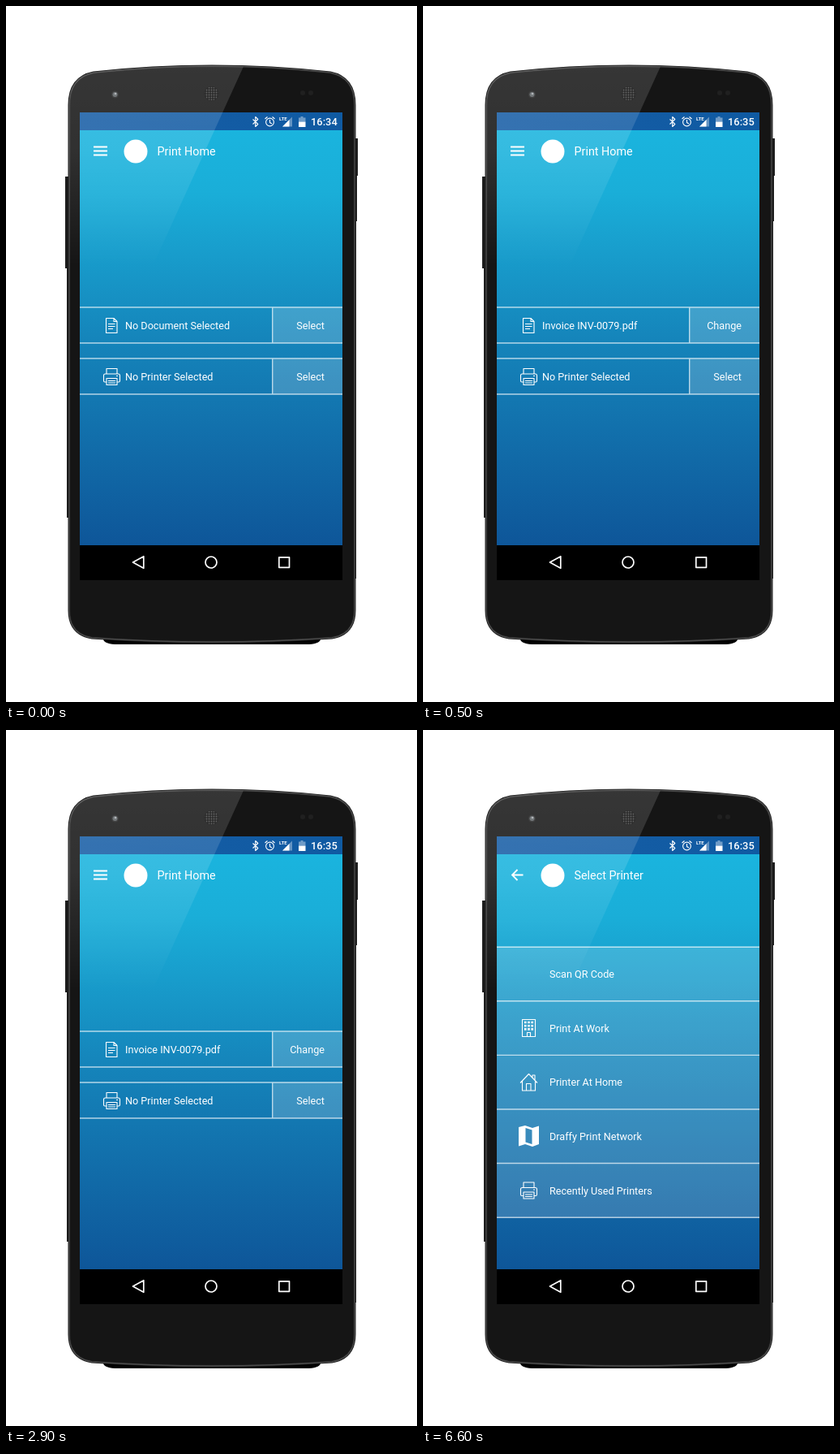
Animation, 507 px wide and 857 px high, one loop 8000 ms. Source, as an HTML page:

```html
<!DOCTYPE html>
<html lang="en">
<head>
<meta charset="utf-8">
<title>Print app</title>
<style>
  html, body { margin: 0; width: 100%; height: 100%; overflow: hidden; background: #fff; }
  svg { display: block; width: 507px; height: 857px; }
  text { font: 12.65px Roboto, sans-serif; fill: #fff; }
  .title { font-size: 14.35px; }
  .clock { font-size: 12.9px; font-weight: 500; }
  .end { text-anchor: end; }
  .icon { fill: none; stroke: #fff; stroke-width: 1.1; stroke-linejoin: round; }
  .rule { fill: none; stroke: #fff; stroke-opacity: .68; stroke-width: 1.4; }

  /* Screens cut hard at 500 ms and 4500 ms of an 8 s loop. */
  .first, .later, .home, .list { animation: 8s step-end infinite; }
  .first { animation-name: first; }
  .later { animation-name: later; }
  .home { animation-name: home; }
  .list { animation-name: list; }
  @keyframes first { 0% { opacity: 1 } 6.25%, 100% { opacity: 0 } }
  @keyframes later { 0% { opacity: 0 } 6.25%, 100% { opacity: 1 } }
  @keyframes home { 0% { opacity: 1 } 56.25%, 100% { opacity: 0 } }
  @keyframes list { 0% { opacity: 0 } 56.25%, 100% { opacity: 1 } }
</style>
</head>
<body>
<svg viewBox="0 0 507 857" xmlns="http://www.w3.org/2000/svg">
  <defs>
    <linearGradient id="sky" x1="0" y1="0" x2="0" y2="1">
      <stop offset="0" stop-color="#1ab4de"/>
      <stop offset=".15" stop-color="#1aaed8"/>
      <stop offset=".5" stop-color="#1585bb"/>
      <stop offset="1" stop-color="#0e5699"/>
    </linearGradient>
    <linearGradient id="bar">
      <stop offset="0" stop-color="#185ea6"/>
      <stop offset="1" stop-color="#0f5aa2"/>
    </linearGradient>
    <linearGradient id="gloss" gradientUnits="userSpaceOnUse" x1="0" y1="77" x2="0" y2="320">
      <stop offset="0" stop-color="#fff" stop-opacity=".14"/>
      <stop offset=".4" stop-color="#fff" stop-opacity=".12"/>
      <stop offset="1" stop-color="#fff" stop-opacity="0"/>
    </linearGradient>
    <pattern id="mesh" width="3" height="3" patternUnits="userSpaceOnUse">
      <circle cx="1.5" cy="1.5" r=".9" fill="#4c4c4c"/>
    </pattern>
    <path id="shell" d="M78 122C78 99 88 86 108 82Q180 74 254 74T400 82C420 86 430 99 430 122V744C430 765 420 775 402 778Q330 783 254 783T106 778C88 775 78 765 78 744Z"/>
    <clipPath id="body"><use href="#shell"/></clipPath>
    <g id="printer" class="icon">
      <path d="M124 453V446.5H137V453M124 463H122Q120.500 463 120.500 461.500V455Q120.500 453 122.500 453H138.500Q140.500 453 140.500 455V461.500Q140.500 463 139 463H137M124 458.500H137V466.500H124ZM126 461.500H135M126 464H135M136 455.500H138"/>
    </g>
  </defs>

  <!-- phone -->
  <path d="M120 774H388V780Q386 786 370 786H138Q122 786 120 780Z"/>
  <path d="M73 210H79V323H73ZM429 163H434V209H429ZM75 323H79V630H75ZM429 209H433V265H429ZM429 265H432V705H429Z" fill="#1c1c1c"/>
  <use href="#shell" fill="#151515" stroke="#1b1b1b" stroke-width="3"/>
  <use href="#shell" fill="none" stroke="#4b4b4b" stroke-width="1.3"/>
  <circle cx="134.500" cy="109" r="4.500" fill="#242424"/>
  <circle cx="134.500" cy="109" r="3" fill="#5d6265"/>
  <circle cx="135" cy="108" r="1.300" fill="#a5aaad"/>
  <circle cx="253.500" cy="108" r="9" fill="#0b0b0b"/>
  <circle cx="253.500" cy="108" r="8.500" fill="url(#mesh)"/>
  <g fill="#202020"><circle cx="366" cy="107" r="3"/><circle cx="376" cy="107" r="3"/></g>

  <!-- screen -->
  <rect x="91" y="131" width="324" height="576"/>
  <rect x="91" y="153" width="324" height="511" fill="url(#sky)"/>
  <rect x="91" y="131" width="324" height="22" fill="url(#bar)"/>
  <path d="M78 70H295L181 320H78Z" fill="url(#gloss)" clip-path="url(#body)"/>

  <!-- status bar -->
  <path class="icon" d="M304.500 139.500L310.800 145.500L307.700 148.500V136.500L310.800 139.500L304.500 145.500"/>
  <g class="icon" stroke-width="1.300">
    <circle cx="325.500" cy="143" r="4.900"/>
    <path d="M325.500 140V143.500L328 145M319.500 139L322.500 136.500M331.500 139L328.500 136.500"/>
  </g>
  <text x="337" y="141" style="font-size:6px;font-weight:700">LTE</text>
  <path d="M353 136.500V148.500H341Z" fill="#fff" fill-opacity=".35"/>
  <path d="M349.500 140V148.500H341Z" fill="#fff"/>
  <path d="M361 137.500H363.500V136H366.500V137.500H369.500V142.500H361Z" fill="#fff" fill-opacity=".4"/>
  <rect x="361" y="142.500" width="8.500" height="6.500" fill="#fff"/>
  <g class="first"><text class="clock" x="376" y="147">16:34</text></g>
  <g class="later"><text class="clock" x="376" y="147">16:35</text></g>

  <circle cx="160" cy="179" r="14.500" fill="#fff"/>

  <g class="home">
    <path class="icon" style="stroke-width:1.900" d="M108 173.500H125M108 178.500H125M108 183.500H125"/>
    <text class="title" x="186.500" y="184">Print Home</text>
    <path d="M328.500 371H415V415H328.500ZM328.500 434H415V478H328.500Z" fill="#fff" fill-opacity=".18"/>
    <path class="rule" d="M91 371H415M91 415H415M91 434H415M91 478H415M328.700 371V415M328.700 434V478"/>
    <path class="icon" d="M123.500 384.500H133L137 388.500V402.500H123.500ZM133 384.500V388.500H137M126 391.500H134.500M126 394.500H134.500M126 397.500H132"/>
    <use href="#printer"/>
    <g class="first">
      <text x="147" y="398">No Document Selected</text>
      <text class="end" x="393" y="398">Select</text>
    </g>
    <g class="later">
      <text x="147" y="398">Invoice INV-0079.pdf</text>
      <text class="end" x="393" y="398">Change</text>
    </g>
    <text x="147" y="461">No Printer Selected</text>
    <text class="end" x="393" y="461">Select</text>
  </g>

  <g class="list">
    <path class="icon" style="stroke-width:1.800;stroke-linejoin:miter" d="M123.500 178.500H110.500M116.500 172L110 178.500L116.500 185"/>
    <text class="title" x="186.500" y="184">Select Printer</text>
    <rect x="91" y="267" width="324" height="333" fill="#fff" fill-opacity=".16"/>
    <path class="rule" d="M91 267.300H415M91 333.700H415M91 400.400H415M91 467H415M91 533.500H415M91 600.200H415"/>
    <text x="156" y="305">Scan QR Code</text>
    <text x="156" y="371.500">Print At Work</text>
    <text x="156" y="438">Printer At Home</text>
    <text x="156" y="505">Draffy Print Network</text>
    <text x="156" y="571.500">Recently Used Printers</text>
    <g class="icon">
      <path d="M122.500 356.500H138.500V377.500H122.500ZM128.500 377.500V372.500H132.500V377.500"/>
      <path stroke-width="2.600" stroke-dasharray="2.600 1.600" d="M125 360H136.500M125 364.200H136.500M125 368.400H136.500"/>
      <path d="M120 434.500L130.500 423.500L141 434.500M122.500 432V444H138.500V432M127.500 444V435.500H133V444M135 428V425H138V431"/>
    </g>
    <path fill="#fff" fill-rule="evenodd" d="M118 489L126 487L135 490L143 487.500V510L135 513L126 510L118 512.500ZM126.500 490V507.500L134.500 510V492.500Z"/>
    <use href="#printer" y="110.500"/>
  </g>

  <!-- navigation bar -->
  <g class="icon" style="stroke-width:1.700">
    <path d="M156.500 685L169.800 677.700V692.300ZM336.800 678.800H349.500V691.300H336.800Z"/>
    <circle cx="253" cy="685" r="7"/>
  </g>
</svg>
</body>
</html>
```
